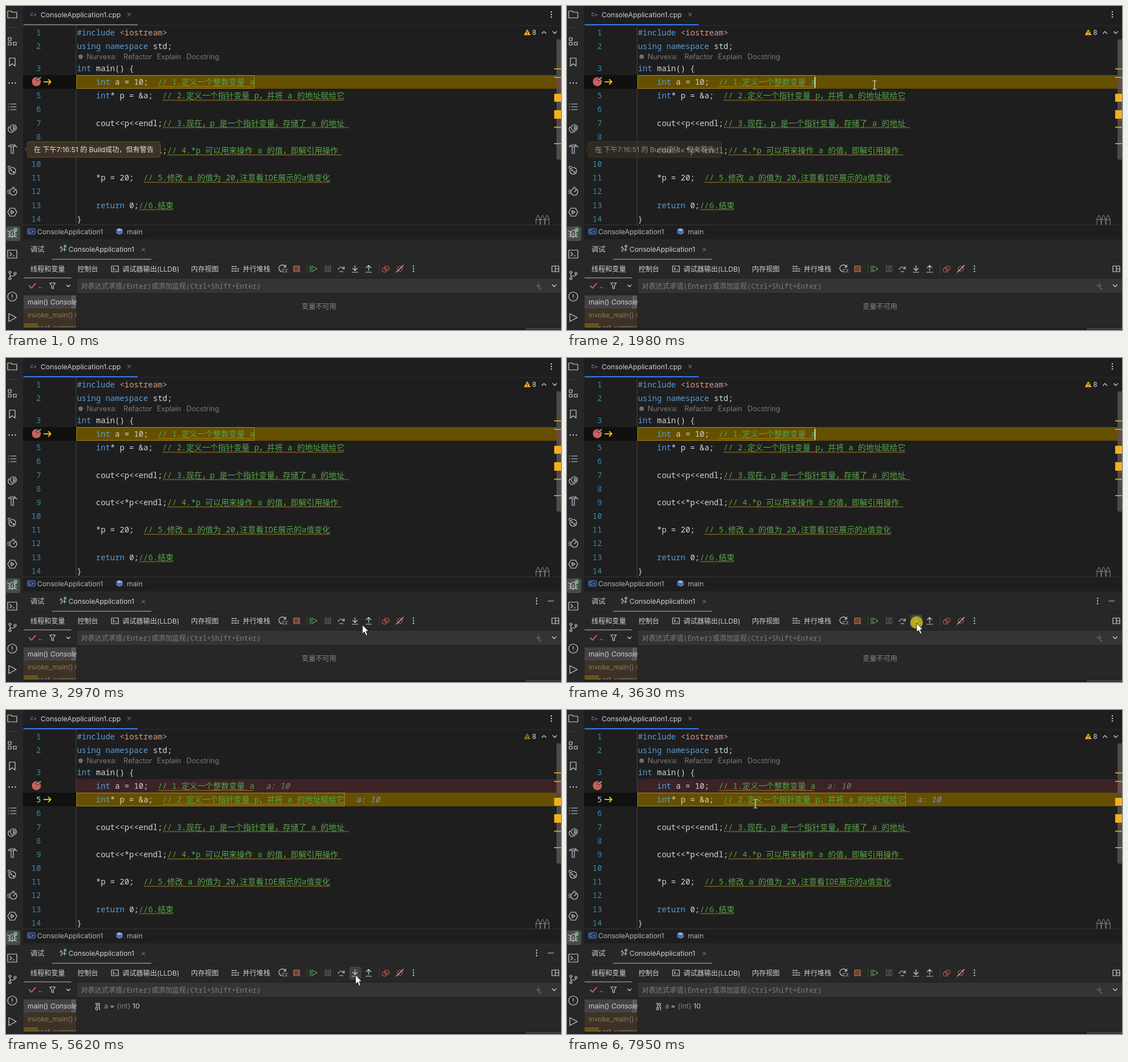
Animation of 978x572 px, one loop 8000 ms. Source, as an HTML page:

```html
<!DOCTYPE html>
<html lang="zh-CN">
<head>
<meta charset="utf-8">
<title>Debugger</title>
<style>
html,body{margin:0;width:100%;height:100%;overflow:hidden;background:#1e1e1e}
svg{display:block;width:978px;height:572px}
text{white-space:pre;font:12.2px Inter,"Noto Sans CJK SC","Noto Sans CJK",sans-serif}
.m{font:13.95px "Noto Sans Mono","Noto Sans CJK SC","Noto Sans CJK",monospace}
.i{stroke-linecap:round;stroke-linejoin:round}
</style>
</head>
<body>
<svg id="stage" viewBox="0 0 978 572" xmlns="http://www.w3.org/2000/svg"></svg>
<script>
const KEY = '#569cd6', COM = '#57a64a', STR = '#d69d85', TXT = '#d4d4d4', NUM = '#3989ad',
      PANEL = '#272728', EDIT = '#1e1e1e', GREY = '#6f7276', GOLD = '#f2b01e', LIGHT = '#ced0d4';

const esc = s => s.replace(/&/g, '&amp;').replace(/</g, '&lt;');
const rect = (x, y, w, h, fill, more = '') =>
  `<rect x="${x}" y="${y}" width="${w}" height="${h}" fill="${fill}" ${more}/>`;
const text = (x, y, s, fill = LIGHT, style = '', more = '') =>
  `<text x="${x}" y="${y}" fill="${fill}" style="${style}" ${more}>${esc(s)}</text>`;
const mono = (x, y, s, fill, style = '', more = '') => text(x, y, s, fill, style, 'class="m" ' + more);
const icon = (x, y, d, color = LIGHT, fill = 'none', width = 1.2) =>
  `<path class="i" transform="translate(${x} ${y})" d="${d}" stroke="${color}" fill="${fill}" stroke-width="${width}"/>`;
const disc = (x, y, r, fill, more = '') => `<circle cx="${x}" cy="${y}" r="${r}" fill="${fill}" ${more}/>`;
const ring = (x, y, r) => `M${x - r} ${y}a${r} ${r} 0 1 0 ${2 * r} 0a${r} ${r} 0 1 0 ${-2 * r} 0`;
const box = (x, y, w, h) => `M${x} ${y}h${w}v${h}h${-w}z`;
const dots = (x, y, dx, dy) => [-1, 0, 1].map(k => disc(x + k * dx, y + k * dy, 1.2, LIGHT)).join('');
const group = (id, body) => `<g id="${id}">${body}</g>`;

const lineY = n => n < 3 ? 47 + 24 * (n - 1) : 110 + 24.15 * (n - 3);
const colX = c => 125 + 8.38 * c;

// line, column, colour, text, squiggle end
const code = [
  [1, 0, KEY, '#include'], [1, 9, STR, '<iostream>'],
  [2, 0, KEY, 'using namespace'], [2, 16, TXT, 'std;'],
  [3, 0, KEY, 'int'], [3, 4, TXT, 'main() {'],
  [4, 4, KEY, 'int'], [4, 8, TXT, 'a = 10;'], [4, 17, COM, '// 1.定义一个整数变量 a', 437],
  [5, 4, KEY, 'int'], [5, 7, TXT, '* p = &a;'], [5, 18, COM, '// 2.定义一个指针变量 p，并将 a 的地址赋给它', 597],
  [7, 4, TXT, 'cout<<p<<endl;'], [7, 18, COM, '// 3.现在，p 是一个指针变量，存储了 a 的地址', 604],
  [9, 4, TXT, 'cout<<*p<<endl;'], [9, 19, COM, '// 4.*p 可以用来操作 a 的值，即解引用操作', 593],
  [11, 4, TXT, '*p = 20;'], [11, 14, COM, '// 5.修改 a 的值为 20,注意看IDE展示的a值变化', 572],
  [13, 4, KEY, 'return'], [13, 11, TXT, '0;'], [13, 13, COM, '//6.结束', 295],
  [14, 0, TXT, '}']
];

function squiggle(x, end, y) {
  let d = `M${x} ${y}`;
  for (let k = 0; x < end - 2; x += 2, k++) d += `l2 ${k % 2 ? 2 : -2}`;
  return `<path d="${d}" fill="none" stroke="#b98d1c"/>`;
}

const band = (y, end) => rect(30, y, 94, 24, '#101010') + rect(124, y, 846, 24, '#665000') +
  rect(124.5, y + .5, end - 124, 23, 'none', 'stroke="#b08a14"');
const pointer = y => icon(73, y, 'M-6 0H6M2-4L6 0L2 4', GOLD, 'none', 2);
const cpp = (x, y) => text(x - 6, y + 3, 'C+', '#8fb3f8', 'font-size:8px');
const close = (x, y) => icon(x, y, 'M-3-3L3 3M3-3L-3 3', '#85888c', 'none', 1);
const warn = icon(918.5, 47, 'M0-5L5 4H-5Z', GOLD, GOLD) + icon(918.5, 47, 'M0-2V1M0 3V3.200', EDIT);

function sidebar() {
  return rect(0, 0, 30, 572, PANEL) + rect(0, 389, 25, 26, '#4a4b4d', 'rx="4"') +
    icon(11, 15, 'M-8 5V-6H-2L0-4H8V6H-8Z') + icon(11, 38, 'M-7 0H7', '#434345') +
    icon(11, 62, box(-7, -6, 5, 5) + box(-7, 2, 5, 5) + box(2, 2, 5, 5)) +
    icon(11, 99, 'M-5-7H5V7L0 3L-5 7Z') + dots(11, 136, 5.5, 0) +
    icon(11, 178, 'M-7-5h1M-3-5H7M-7 0h1M-3 0H7M-7 5h1M-3 5H7') +
    icon(11, 216, ring(2, -1, 5.5) + 'M-5-3A5 5 0 1 0 2 6M2-4A3 3 0 0 1 2 2Z') +
    icon(11, 252, 'M-7-4Q-5-7 0-7H4L8-3M-7-4H4V-7M-2-4V8H2V-4') +
    icon(11, 290, ring(0, 1, 6) + ring(-2, 0, 1) + ring(2, 3, 1) + 'M-7-7H-3M-7-7V-3') +
    icon(11, 327, ring(2, 1, 6) + 'M2 1L5-2M0-7H4M-8-2H-5M-9 1H-5M-8 4H-5') +
    icon(11, 364, 'M-4-7H4L8 0L4 7H-4L-8 0ZM-2-3L3 0L-2 3Z') +
    icon(11, 401, 'M-4-1Q-4-5 0-5Q4-5 4-1V3Q4 7 0 7Q-4 7-4 3ZM-8-4L-4-1M8-4L4-1M-8 2H-4M8 2H4M-7 7L-4 4M7 7L4 4M0-1V7') +
    disc(17, 395, 3.5, '#57b85c') +
    icon(11, 438, box(-8, -7, 16, 14) + 'M-4-3L-1 0L-4 3M1 3H4') +
    icon(11, 475, ring(-4, -5, 2) + ring(5, -3, 2) + ring(-4, 6, 2) + 'M-4-3V4M5-1Q5 2-4 2') +
    icon(11, 513, ring(0, 0, 8) + 'M0-4V1M0 4V4.200') + icon(11, 550, 'M-6-7L7 0L-6 7Z');
}

function editor() {
  let s = rect(30, 34, 948, 1, '#2d2d2e') + cpp(49, 15) + text(61, 20, 'ConsoleApplication1.cpp') +
    close(217, 15) + dots(961, 15, 0, 4.5) + rect(31, 32, 201, 2, GREY, 'id="tab"') +
    rect(123, 35, 1, 351, '#434343') +
    group('first', band(122, 437) + pointer(134)) +
    group('second', rect(124, 122, 846, 24, '#3b2326') + band(146, 596) + pointer(158) +
      mono(458, 139, 'a: 10', '#7c7f86', 'font-style:italic') +
      mono(617, 163, 'a: 10', '#6a9be0', 'font-style:italic')) +
    group('wrench', icon(76, 134, 'M-6-3L-3 0L0-3L-3-6Q1-7 3-3L2-1L7 4L4 7L-1 2Q-5 2-6-3Z', '#a8abb0', '#a8abb0', 1));
  for (let n = 1; n < 15; n++)
    if (n != 4) s += mono(61.5, lineY(n) + 5, '' + n, NUM, '', `id="n${n}" text-anchor="end"`);
  for (const [n, c, color, str, end] of code) {
    s += mono(colX(c), lineY(n) + 5, str, color);
    if (end) s += squiggle(colX(c), end, lineY(n) + 9);
  }
  s += disc(131.5, 89.5, 4, '#6f6f6f');
  for (const [x, str] of [[142, 'Nurvexa:'], [207, 'Refactor'], [266, 'Explain'], [318, 'Docstring']])
    s += text(x, 94, str, '#7a7a7c', 'font-size:12.6px');
  s += disc(53.5, 133.5, 8, '#c95f5b') +
    icon(57, 129, 'M-3 0L-1 2L4-3', EDIT, 'none', 3.5) + icon(57, 129, 'M-3 0L-1 2L4-3', '#d8d8d8');
  s += rect(970, 59, 8, 212, '#4b4b4b') + rect(970, 127, 8, 20, '#6a4a42') +
    [111, 126, 214, 243].map(y => rect(966, y - 1, 12, 2, '#d29a12')).join('') +
    rect(966, 155, 12, 14, GOLD) + rect(966, 184, 12, 15, GOLD) +
    group('warn', warn) + text(927, 51, '8') +
    icon(948, 47, 'M-3.500 1.500L0-2L3.500 1.500') + icon(967, 47, 'M-3.500-2L0 1.500L3.500-2');
  for (const x of [937.5, 945.5, 953.5]) s += icon(x, 377, 'M-3.500 9V-1L0-8L3.500-1V9M-3.500 0H3.500', '#8e8e8e', 'none', 1);
  return s;
}

function debug() {
  const dim = '#7d7f82', green = '#57a65b', red = '#c75d4d';
  const bits = { font: 'font:700 8px Inter,sans-serif' };
  let s = rect(30, 386, 948, 1, '#353535') +
    rect(38, 393, 14, 10, '#25324d', 'rx="1.5" stroke="#548af7" stroke-width=".9"') + cpp(45, 398) +
    text(55, 403, 'ConsoleApplication1', '#b4b6ba') +
    icon(200, 398, 'M0-5L5-3V3L0 5L-5 3V-3Z', '#5f8fce', '#4670ad', 1) + icon(200, 398, 'M-4-3L0-1L4-3L0-4.500Z', '#9dbfec', '#9dbfec', 1) +
    text(213, 403, 'main', '#b4b6ba') +
    rect(30, 411, 948, 161, PANEL) + rect(30, 411, 948, 1, EDIT) +
    text(43, 434, '调试') + icon(100, 429, 'M-5-2H-1V2M-3 2V5M1 1H6M3-2V4M-3-5V-2') +
    disc(104, 424, 2.5, '#57b85c') + text(110, 434, 'ConsoleApplication1') + close(242, 430) +
    rect(30, 447, 948, 1, EDIT) + rect(81, 446, 175, 2, GREY) +
    text(43, 469, '线程和变量') + text(126, 469, '控制台') + icon(192, 464, box(-6, -5, 12, 10) + 'M-3-2L-1 0L-3 2M1 2H3') +
    text(205, 469, '调试器输出(LLDB)') + text(326, 469, '内存视图') +
    icon(404, 464, 'M-6-4H-3M-1-4H2M-6 0H-3M-1 0H2M4 0H6M-6 4H-3M-1 4H2M4 4H6', LIGHT, 'none', 1.5) +
    text(417, 469, '并行堆栈') + group('hover', rect(605, 453, 21, 23, '#3f4042', 'rx="4"'));
  s += icon(488, 464, 'M4-4A6 6 0 1 0-2 5M5-7V-3H1') +
    icon(491, 467, ring(0, 0, 3) + 'M-5-2L-3-1M5-2L3-1M-5 3L-3 2M5 3L3 2', green) +
    icon(512, 464, box(-5, -5, 10, 10), '#c77055', '#70402f') +
    rect(530, 456, 1, 17, '#434345') + rect(657, 456, 1, 17, '#434345') +
    icon(542, 464, 'M-6-5V5M-3-5V5L6 0Z', green) + icon(567, 464, box(-4, -5, 3, 10) + box(2, -5, 3, 10), GREY, 'none', 1) +
    icon(591, 464, 'M-6 1Q0-7 5 0M5-4V0H1M-3 5H3') + icon(615, 464, 'M0-6V3M-4-1L0 3L4-1M-5 6H5') +
    icon(639, 464, 'M0 3V-6M-4-2L0-6L4-2M-5 6H5') + icon(669, 464, ring(2, -1, 4) + ring(-2, 2, 4), red) +
    icon(694, 464, ring(0, 0, 4.5), red) + icon(694, 464, 'M-6 6L6-6') + dots(718, 464, 0, 4.5) +
    icon(968, 464, box(-6, -5, 12, 10) + 'M0-5V5M0 0H6') +
    rect(30, 480, 948, 1, EDIT) + rect(31, 479, 84, 2, GREY);
  s += rect(125, 481, 853, 26, '#343435') + rect(30, 507, 948, 1, EDIT) +
    icon(46, 494, 'M-5 0L-1 4L6-4', red, 'none', 2) + text(57, 498, '..') +
    icon(82, 494, 'M-5-5H5L1.500 0V5L-1.500 4V0Z') + icon(110, 494, 'M-3-1.500L0 1.500L3-1.500') +
    mono(132, 498.5, '对表达式求值(Enter)或添加监视(Ctrl+Shift+Enter)', dim, 'font-size:12.2px') +
    icon(938, 494, 'M-5 0H4M0-5V4M3 3v3m0 0h3', GREY) + icon(966, 494, 'M-3.500-2L0 1.500L3.500-2');
  s += '<clipPath id="list"><path d="M31 509H124V568H31Z"/></clipPath><g clip-path="url(#list)">' +
    rect(31, 511, 93, 23, '#434345') + rect(31, 534, 93, 34, '#3d3223') + rect(31, 560, 25, 8, '#66541f') +
    rect(115, 511, 8, 23, '#58595b') +
    text(38, 527, 'main()') + text(78, 527, 'ConsoleApplication1', LIGHT, 'font-style:italic') +
    text(38, 550, 'invoke_main() ConsoleApplication1', '#837a6a') + text(50, 572, '_scrt_common_main', '#837a6a') +
    '</g>' + rect(124, 481, 1, 87, EDIT) + rect(30, 568, 948, 4, EDIT) + rect(916, 569, 62, 2, '#4a4a4a');
  s += group('none', text(521, 535, '变量不可用', '#85878a')) +
    group('vars', text(157, 522.5, '10', LIGHT, bits.font) + text(157, 530, '01', LIGHT, bits.font) +
      text(173, 527, 'a', '#6f9fd8') + text(183, 527, '=') + text(195, 527, '{int}', dim) + text(223, 527, '10'));
  return s + group('tools', dots(935, 429, 0, 4.5) + icon(960, 429, 'M-5 0H5'));
}

const tip = group('tip', '<path d="M41 239.500H268Q272 239.500 272 243V263Q272 267 268 267H41Q37.500 267 37.500 263V257L33 253L37.500 249V243Q37.500 239.500 41 239.500Z" fill="#3d3223" stroke="#5e4d33"/>' +
  text(49, 257.5, '在 下午7:16:51 的 Build成功，但有警告', '#dfe1e5'));

const stage = document.getElementById('stage');
stage.innerHTML = rect(0, 0, 978, 572, EDIT) + editor() + debug() + sidebar() + tip +
  rect(0, 0, 2, 19, '#d0d0d0', 'id="caret"') + disc(616, 467, 11, '#c9bd16', 'id="click"') +
  '<path id="arrow" d="M0 0V16L3.700 12.500L6.300 19L9 18L6.500 11.500H11Z" fill="#fff" stroke="#111" stroke-width=".9"/>' +
  '<path id="beam" d="M-3.500-7.500H-1L0-6.500L1-7.500H3.500M0-6.500V6.500M-3.500 7.500H-1L0 6.500L1 7.500H3.500" fill="none" stroke="#e4e4e4" stroke-width="1.200"/>';

// time, pointer shape, x, y
const moves = [
  [0, '', 0, 0], [660, 'arrow', 688, 478], [990, 'arrow', 624, 444], [1320, 'beam', 626.5, 252],
  [1650, 'beam', 542, 139.5], [2310, 'beam', 585.5, 324.5], [2640, 'arrow', 648, 475],
  [2970, 'arrow', 628, 471], [3300, 'arrow', 616, 468], [6950, 'arrow', 683, 448],
  [7280, 'beam', 615.5, 107], [7620, 'beam', 342.5, 174], [7950, 'beam', 332, 165.5]
];
const el = id => document.getElementById(id);
const fade = (id, v) => el(id).setAttribute('opacity', +v);

function draw(t) {
  const within = (a, b) => t >= a && t < b, stepped = t >= 3960;
  const [, shape, x, y] = moves.findLast(m => m[0] <= t);
  for (const id of ['arrow', 'beam']) {
    fade(id, id == shape);
    el(id).setAttribute('transform', `translate(${x} ${y})`);
  }
  el('tab').setAttribute('fill', t < 1980 ? GREY : '#3574f0');
  fade('first', !stepped);
  fade('second', stepped);
  fade('none', !stepped);
  fade('vars', stepped);
  el('n5').setAttribute('fill', stepped ? '#c5d3dc' : NUM);
  fade('wrench', within(3960, 4290));
  fade('warn', within(4290, 6310) ? .55 : 1);
  fade('tip', t < 1980 ? 1 : t < 2310 ? .55 : 0);
  fade('tools', within(1320, 1650) ? .5 : within(660, 1320) || within(2640, 7280));
  fade('hover', within(3300, 6950));
  fade('click', within(3630, 3960) ? .82 : 0);
  fade('caret', within(1980, 2970) || within(3300, 5620) || within(5950, 6950) || within(7620, 7950));
  el('caret').setAttribute('transform', stepped ? 'translate(125 149)' : 'translate(436 125)');
}

const start = performance.now();
(function tick() {
  draw((performance.now() - start) % 8000);
  requestAnimationFrame(tick);
})();
</script>
</body>
</html>
```
